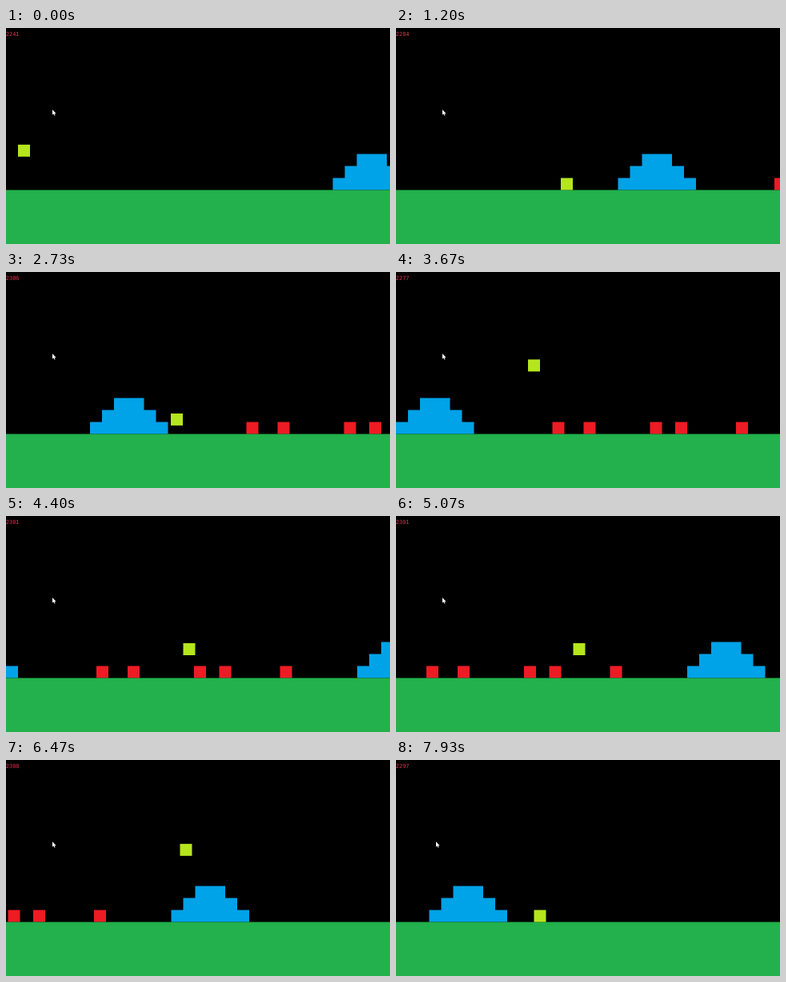
Animation, 480 px wide and 270 px high, one loop 8 s. Source, as an HTML page:

```html
<!DOCTYPE html>
<html lang="en">
<head>
<meta charset="utf-8">
<title>Block runner</title>
<style>
  html, body { margin: 0; width: 100%; height: 100%; overflow: hidden; background: #000; }
  svg { display: block; width: 100%; height: 100%; }
  text { font: 7px "DejaVu Sans Mono", monospace; fill: #e0304c; }
</style>
</head>
<body>
<svg viewBox="0 0 480 270">
  <defs>
    <path id="pyramid" fill="#00a2e8" d="M0 202.5v-15h15v-15h15v-15h37.5v15h15v15h15v15z"/>
    <rect id="spike" fill="#ed1c24" y="187.5" width="15" height="15"/>
  </defs>
  <rect width="480" height="270"/>
  <g id="world"></g>
  <rect fill="#22b14c" y="202.5" width="480" height="67.5"/>
  <rect id="player" fill="#b5e61d" width="15" height="15"/>
  <text id="counter" x="-0.3" y="10.4"></text>
  <path id="cursor" fill="#fff" d="M0 0v6.6l1.5-1.3 1 2.2 1.1-.5-1-2.1h2z"/>
</svg>
<script>
const LOOP = 8000, STEP = 200 / 3;
const FLOOR = 187.5, GRAVITY = 2.58, JUMP = 93;

// Tables of [step, value]; x positions move linearly between entries.
const playerX = [[0, 15], [1, 0], [6, 0], [15.2, 206], [42, 206], [43.8, 165],
  [55, 165], [57.5, 221.5], [84, 221.5], [84.2, 217.5], [97, 217.5],
  [101, 307.5], [113, 307.5], [119, 172.5]];
const cursorX = [[112, 58], [116, 50]];
const jumpPeaks = [-4.46, 29, 57.4, 71, 85, 99];
const ledges = [ // stands at a height from land to leave, then drops
  { land: 33.2, leave: 36.5, height: 45 },
  { land: 39.7, leave: 39.7, height: 15 }
];
const counts = [2241, 2284, 2314, 2306, 2277, 2301, 2303, 2308, 2297];

const el = id => document.getElementById(id);
const world = el("world"), player = el("player");
const counter = el("counter"), cursor = el("cursor");

function place(kind, ...positions) {
  for (const x of positions) {
    const use = document.createElementNS("http://www.w3.org/2000/svg", "use");
    use.setAttribute("href", "#" + kind);
    use.setAttribute("x", x);
    world.append(use);
  }
}
place("pyramid", 412.5, 934);
place("spike", 608, 647, 730, 761.5, 837.5);

function along(table, step) {
  const next = table.findIndex(([s]) => s > step);
  if (next === 0) return table[0][1];
  if (next < 0) return table[table.length - 1][1];
  const [s0, v0] = table[next - 1], [s1, v1] = table[next];
  return v0 + (v1 - v0) * (step - s0) / (s1 - s0);
}

function heightAt(step) {
  const arcs = jumpPeaks.map(peak => JUMP - GRAVITY * (step - peak) ** 2);
  const rests = ledges.map(({ land, leave, height }) =>
    step < land ? 0 : height - GRAVITY * Math.max(0, step - leave) ** 2);
  return Math.max(0, ...arcs, ...rests);
}

const scrollAt = step => step < 18 ? 4 + step * 131 / 18 : step * 7.5;

const move = (node, x, y) => node.setAttribute("transform", `translate(${x} ${y})`);

function draw(time) {
  const step = Math.min(119, Math.floor((time + 4) / STEP));
  move(world, -scrollAt(step), 0);
  move(player, along(playerX, step), FLOOR - heightAt(step));
  move(cursor, along(cursorX, step), 102);
  counter.textContent = counts[Math.floor((step + 9) / 15)];
}

const start = performance.now();
function tick() {
  draw((performance.now() - start) % LOOP);
  requestAnimationFrame(tick);
}
tick();
</script>
</body>
</html>
```
